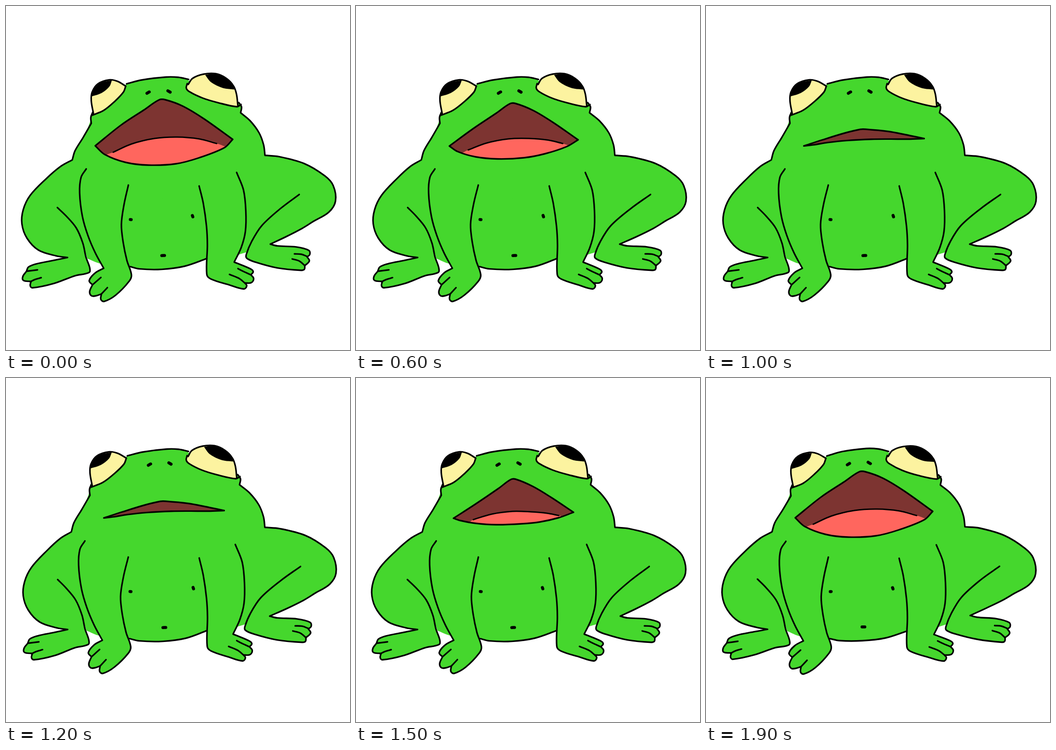
Animation of 748x748 px, one loop 2.1 s. Source, as an HTML page with a canvas:

```html
<!DOCTYPE html>
<html lang="en">
<head>
<meta charset="utf-8">
<title>Croaking frog</title>
<style>
html, body { margin: 0; width: 100%; height: 100%; overflow: hidden; background: #fff; }
canvas { display: block; }
</style>
</head>
<body>
<canvas id="stage" width="748" height="748"></canvas>
<script>
const ctx = document.getElementById('stage').getContext('2d');
const GREEN = '#45d72d', YELLOW = '#fcf3a0', MAROON = '#7d3431', PINK = '#ff665e', INK = '#000';
const HUB = [340, 420]; // a point inside the belly that closes every open body line

// Points are "x,y"; a trailing "!" marks a sharp corner.
const frog = {
  torso: '186,240! 262,170! 397,163! 505,222! 540,300! 640,410! 597,440! 555,477! 535,508! 522,535! 500,542! 437,550! 390,563! 270,564! 205,561 176,550! 166,516! 152,483! 112,438! 150,340!',
  head: '263,169 297,160 349,154 375,155 397,160',
  leftLeg: '187,232 183,243 184,256! 166,287 149,315 143,335! 118,349 88,375 54,411 39,442 36,473 47,504 72,530 110,543 134,547! 103,553 67,560 50,567 46,576! 38,587 39,596 56,598! 54,607 59,612 105,603 150,587 180,580 181,570 173,547 166,516 152,483 130,456 112,438',
  rightLeg: '505,210 511,219 509,232! 530,249 550,275 560,301 563,324! 595,327 650,343 694,370 712,391 717,425 703,449 670,469 645,484 610,501 574,517! 590,521 632,524 660,532 662,541 656,546! 661,555 651,565! 650,573 643,575 590,569 540,556 522,548 521,540 533,511 555,477 597,440 639,410',
  leftArm: '173,355 162,373 159,407 165,458 177,500 193,538 211,571! 193,581 180,598 187,607! 181,622 185,631 194,631 206,627! 205,639 212,643 237,629 267,598 272,584 262,553 254,515 250,475 256,432 266,389',
  rightArm: '420,392 429,430 436,480 438,520 437,584 445,594 485,607 516,615 522,608 518,602! 532,601 537,592 531,584! 536,577 530,571 495,557! 510,525 519,490 520,445 515,400 500,362',
  belly: '268,566 290,571 340,572 390,566 437,550',
  toes: ['46,576 70,573', '54,599 64,594 78,590', '656,545 643,540 628,539', '651,565 639,555 623,550', '187,607 205,591', '206,627 219,613', '485,584 505,592 518,602', '503,571 515,577 531,584'],
  dots: ['308,189 313,186', '353,184 358,187', '270,464 272,464', '406,456 407,459', '340,542 346,542'],
  eyes: [
    {
      ball: '189,236 184,207 186,188 199,170 225,161 243,164 261,174',
      lid: '261,174 256,187 236,208 211,228 184,239',
      pupil: '184,197! 189,184 205,168 229,163! 224,175 207,189'
    },
    {
      ball: '396,171 405,158 428,149 455,148 478,158 494,175 500,192 503,217',
      lid: '510,214 501,219 460,211 427,201 399,187 392,179 394,169',
      pupil: '433,151! 455,148 475,156 490,168 495,181! 470,178 445,166'
    }
  ]
};

// Key shapes of the mouth, with matching points so that they can be blended.
const upperLip = {
  wide: '194,304! 250,259 300,226 333,204 347,204 385,218 430,245 493,290!',
  half: '212,305! 260,274 310,240 336,221 347,220 385,236 425,260 473,292!',
  shut: '213,304! 250,297 300,288 335,284 347,284 400,285 435,286 475,287!'
};
const lowerLip = {
  wide: '475,308 420,330 370,343 310,346 260,340 215,323',
  half: '440,304 400,313 360,317 305,319 260,316 227,310',
  shut: '440,288 400,287 360,287 305,290 265,295 235,301'
};
const tongue = {
  wide: '219,323 233,318 273,300 323,288 372,285 420,289 458,299 478,306',
  half: '245,315 255,308 295,296 340,290 380,291 415,294 441,299 452,303'
};

const clamp = v => Math.min(1, Math.max(0, v));

const parse = text => text.split(' ').flatMap(pair => {
  const point = pair.split(',').map(parseFloat);
  return pair.endsWith('!') ? [point, point] : [point];
});

const mix = (from, to, k) => from.map((p, i) => p.map((v, axis) => v + (to[i][axis] - v) * k));

// Each redrawing bends the whole frog slightly: a ripple across its width.
function wobble(points, drawing) {
  const swing = -1.5 * Math.cos(drawing * Math.PI / 3);
  return points.map(([x, y]) => [
    x + swing * Math.cos((x - 287.5 - y * 0.15) / 49),
    y + 0.8 * Math.sin(x / 40 + drawing * 2.1)
  ]);
}

// Smooth curve through the points; doubled points stay sharp.
function curve(points) {
  const path = new Path2D();
  const handle = (i, reach) => {
    const a = points[Math.max(i - 1, 0)], b = points[Math.min(i + 1, points.length - 1)];
    const scale = reach / (Math.hypot(b[0] - a[0], b[1] - a[1]) || 1);
    return [(b[0] - a[0]) * scale, (b[1] - a[1]) * scale];
  };
  path.moveTo(...points[0]);
  for (let i = 1; i < points.length; i++) {
    const [x0, y0] = points[i - 1], [x1, y1] = points[i];
    const reach = Math.hypot(x1 - x0, y1 - y0) * 0.34;
    if (!reach) continue;
    const [ax, ay] = handle(i - 1, reach), [bx, by] = handle(i, reach);
    path.bezierCurveTo(x0 + ax, y0 + ay, x1 - bx, y1 - by, x1, y1);
  }
  return path;
}

const closed = points => curve([...points, points[0]]);

function fill(path, color) {
  ctx.fillStyle = color;
  ctx.fill(path);
}

function ink(path, width = 3.4) {
  ctx.lineWidth = width;
  ctx.stroke(path);
}

function drawBody(trace) {
  const lines = [frog.head, frog.leftLeg, frog.rightLeg, frog.leftArm, frog.rightArm, frog.belly].map(trace);
  fill(closed(trace(frog.torso)), GREEN);
  for (const line of lines) {
    const area = curve(line);
    area.lineTo(...HUB);
    fill(area, GREEN);
  }
  for (const line of [...lines, ...frog.toes.map(trace)]) ink(curve(line));
  for (const dot of frog.dots) ink(curve(trace(dot)), 6.5);
}

function drawEye(eye, trace) {
  const ball = trace(eye.ball), lid = trace(eye.lid), pupil = closed(trace(eye.pupil));
  fill(curve([...ball, ball.at(-1), lid[0], ...lid]), YELLOW);
  fill(pupil, INK);
  ink(pupil, 1.5);
  ink(curve(ball));
  ink(curve(lid));
}

// closing runs from wide to half open, shutting from half open to shut.
function drawMouth(closing, shutting) {
  const blend = ({ wide, half, shut = half }, k) =>
    mix(mix(parse(wide), parse(half), closing), parse(shut), k);
  const lips = closed([...blend(upperLip, shutting), ...blend(lowerLip, Math.cbrt(shutting))]);
  fill(lips, MAROON);
  if (shutting < 0.5) {
    const top = blend(tongue, 0), flesh = curve(top);
    flesh.lineTo(460, 400);
    flesh.lineTo(230, 400);
    ctx.save();
    ctx.clip(lips);
    fill(flesh, PINK);
    ctx.restore();
    if (!shutting) ink(curve(top.slice(1, -1)), 3);
  }
  ink(lips);
}

// 16 drawings per loop: the wide-open ones are held twice as long.
function stepAt(t) {
  if (t < 600) return Math.floor(t / 200);
  if (t < 1700) return 3 + Math.floor((t - 600) / 100);
  return 14 + Math.floor((t - 1700) / 200);
}

ctx.lineCap = ctx.lineJoin = 'round';
ctx.strokeStyle = INK;
const start = performance.now();

function render() {
  const step = stepAt((performance.now() - start) % 2100);
  const stage = Math.min(step, 16 - step); // the second half mirrors the first
  const trace = text => wobble(parse(text), stage % 4);
  ctx.fillStyle = '#fff';
  ctx.fillRect(0, 0, 748, 748);
  drawBody(trace);
  for (const eye of frog.eyes) drawEye(eye, trace);
  drawMouth(clamp((stage - 2) / 2), clamp((stage - 4) / 4));
  requestAnimationFrame(render);
}
render();
</script>
</body>
</html>
```
